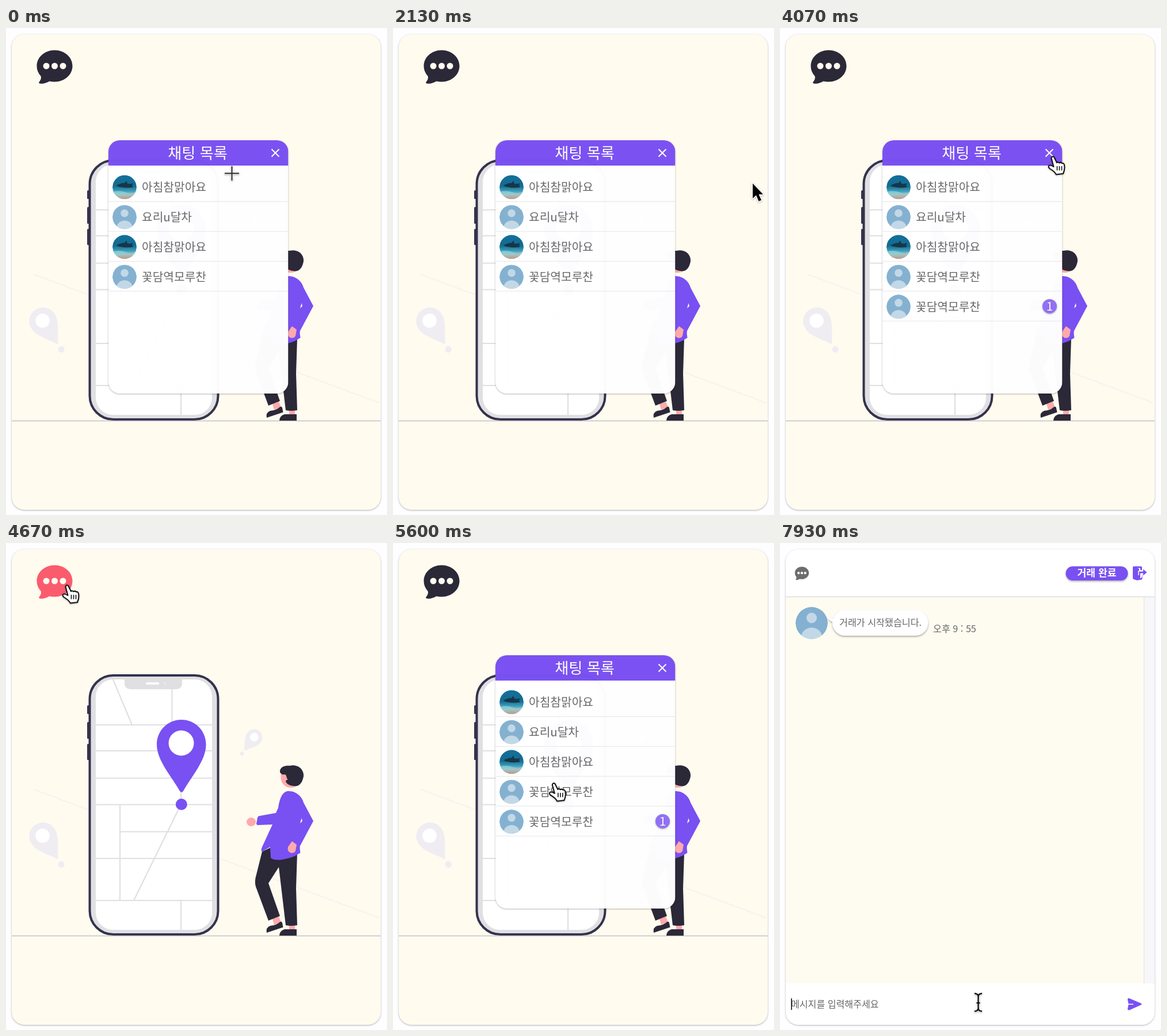
Write an HTML page that moves like this. It is 662 px wide and 846 px high and loops after 8 s.

```html
<!DOCTYPE html>
<html lang="ko">
<head>
<meta charset="utf-8">
<style>
html, body { margin: 0; width: 100%; height: 100%; overflow: hidden; background: #fefdff; }
svg { display: block; width: 662px; height: 846px; font-family: "Noto Sans CJK KR", "Noto Sans CJK", "Noto Sans", sans-serif; fill: none; }
text { white-space: pre; }
.p { fill: #7950f2; }
.d { fill: #2b2838; }
.k { fill: #ffa9ab; }
.w { fill: #fff; }
.g { fill: #e0dfe2; }
.t { fill: #666; }
.pale { fill: #efedf2; }
.soft { filter: drop-shadow(0 1px 1.5px rgba(0,0,0,.3)); }
.low { filter: drop-shadow(0 2px 1.5px rgba(0,0,0,.3)); }
#spin { box-sizing: border-box; width: 117px; height: 117px; border-radius: 50%;
  border: 7px solid #dad5ea; border-left: 9px solid #7950f2; }
</style>
</head>
<body>
<svg viewBox="0 0 662 846">
  <defs>
    <clipPath id="card"><rect x="10" y="11" width="641" height="826" rx="22"/></clipPath>
    <clipPath id="round"><circle r="21"/></clipPath>
    <clipPath id="panel"><rect x="178" y="195" width="312.5" height="440" rx="20"/></clipPath>
    <linearGradient id="sea" x2="0" y2="1">
      <stop offset="0" stop-color="#0f6f9c"/><stop offset=".45" stop-color="#12688f"/>
      <stop offset=".68" stop-color="#3fa3bd"/><stop offset=".8" stop-color="#a9c3c4"/>
      <stop offset="1" stop-color="#b49a88"/>
    </linearGradient>
    <path id="pin" d="M304.8 307C328.5 307 347.5 326 347.5 350C347.5 378 323 404 308 431Q305 435 302 431C287 404 262 378 262 350C262 326 281 307 304.8 307Z"/>
    <g id="marker">
      <use href="#pin"/><circle class="w" cx="304.5" cy="347.5" r="22"/><circle cx="304.8" cy="454" r="10"/>
    </g>
    <path id="bubble" d="M84.5 38.5C101.600 38.5 115.500 50.700 115.500 66C115.500 81.300 101.600 93.500 84.500 93.500Q80 93.500 75.500 92.500Q67 97.500 59 96.500Q55.500 95.500 58.500 92.500Q62 88 60.500 83.500Q53.500 76 53.500 66C53.500 50.700 67.400 38.500 84.500 38.500Z"/>
    <g id="dots"><circle cx="70" cy="66" r="5.500"/><circle cx="84.500" cy="66" r="5.500"/><circle cx="99" cy="66" r="5.500"/></g>
    <g id="user" clip-path="url(#round)">
      <circle r="21" fill="#84b0d1"/>
      <g fill="#c3d8e7"><circle cy="-6.700" r="6.800"/><ellipse cy="18" rx="13.500" ry="12"/></g>
    </g>
    <g id="photo" clip-path="url(#round)">
      <circle r="21" fill="url(#sea)"/>
      <path d="M-14 -3Q-4 -8 0 -7L3 -11L5 -6Q10 -5 15 -7L13 -3L15 0Q2 2 -5 0Q-11 0 -14 -3Z" fill="#123447"/>
      <path d="M-21 8Q-8 5 2 9T21 7V12Q8 10 -2 13T-21 11Z" fill="#8ed0d8" opacity=".8"/>
    </g>
  </defs>

  <rect class="soft" x="10" y="11" width="641" height="826" rx="22" fill="#fffbef"/>

  <g id="home">
    <use id="chatIcon" href="#bubble"/><use href="#dots" fill="#fffbef"/>
    <path d="M48 428L648 651" stroke="#eceaf0"/>
    <use href="#marker" class="pale" transform="translate(64.500 509.500) rotate(-33) scale(.56) translate(-305 -350)"/>
    <use href="#marker" class="pale" transform="translate(431 338) rotate(37) scale(.336) translate(-305 -350)"/>
    <g fill="#35324d">
      <rect x="141" y="282" width="6" height="15" rx="1.500"/>
      <rect x="141" y="311" width="6" height="29" rx="1.500"/>
      <rect x="141" y="349" width="6" height="28" rx="1.500"/>
    </g>
    <rect x="145.500" y="230" width="223" height="450" rx="41" class="g" stroke="#35324d" stroke-width="4"/>
    <rect x="156" y="237" width="202" height="435" rx="30" class="w"/>
    <path d="M156 316H358M156 361H358M156 408.500H358M156 454.500H358M198 501.500H358M156 548H358M156 621H358M198 454V621M288.500 250V316M304 621V672M186 237L219 316M304 430V454L222 621" stroke="#e0dfe2" stroke-width="2.200"/>
    <path class="g" d="M206 236H306V243Q306 254 295 254H217Q206 254 206 243Z"/>
    <rect class="w" x="243" y="242" width="23" height="4" rx="2"/><circle class="w" cx="276" cy="244" r="1"/>
    <use href="#marker" class="p"/>
    <path d="M10 682.500H651" stroke="#c3c1c7" stroke-width="1.600"/>

    <g id="man">
      <path class="k" d="M463 653L474 649L478 659L466 663ZM492 663H502V672H492Z"/>
      <path class="d" d="M445 536L462 528L490 545L506 539L504 600L506 664Q495 666 486 664L474 563L456 591L476 648L456 656L434 597Q432 590 433.500 582Z"/>
      <path class="d" d="M453 677Q451 668 459 665Q470 664 475 659Q479 656 480 660L481.500 667.500ZM475 682Q475 674 484 671H505V682Z"/>
      <path class="k" d="M478 400C475 416 484 425 495 425Q502 425 506 420L504 400Z"/>
      <path class="d" d="M476 398C475 390 484 386 492 387C508 383 518 394 517 405C515 418 508 424 499 422C490 421 487 417 486 414Q487 411 490 411C486 408 489 403 484 402Q478 403 476 398Z"/>
      <ellipse class="k" cx="426" cy="484.500" rx="8" ry="7.500"/>
      <path class="p" d="M473 460C476 440 482 431 491 431C504 431 514 440 517 451L534 483L511 526Q510 530 511.500 538Q500 547 480 550Q466 552 460 547L459 528L445 536Q442 535 445 528L463 489L438 490Q434 490 435.500 485L437 477Q438 474 441 474L469 469Z"/>
      <path d="M513.500 478L511 487L515 483Z" fill="#fffbef"/>
      <path class="k" d="M497 518L505 524L503 535Q500 540 494 538Q488 535 490 528Z"/>
    </g>

    <g id="dialog" class="soft">
      <g clip-path="url(#panel)">
        <rect class="w" x="178" y="195" width="312.500" height="440"/>
        <rect class="p" x="178" y="195" width="312.500" height="44"/>
      </g>
      <text x="333" y="227" font-size="26.100" text-anchor="middle" class="w">채팅 목록</text>
      <path d="M461.500 210.500L474.500 223.500M474.500 210.500L461.500 223.500" stroke="#fff" stroke-width="2"/>
      <g id="rows"></g>
    </g>
  </g>

  <g id="chat">
    <g clip-path="url(#card)">
      <rect class="w" x="10" y="11" width="641" height="826"/>
      <rect x="10" y="94" width="623" height="671" fill="#fefcf0"/>
      <rect x="633" y="94" width="18" height="671" fill="#f7f6f8"/>
      <path d="M632.500 94V765" stroke="#e2e1e4"/>
      <path d="M10 93.500H651" stroke="#dddce0" stroke-width="1.500"/>
    </g>
    <g transform="translate(38 52.500) scale(.395) translate(-84.500 -67)" fill="#6d6d70"><use href="#bubble"/><use href="#dots" class="w"/></g>
    <rect class="p low" x="496.500" y="40.500" width="108" height="24.500" rx="12.200"/>
    <text x="550.500" y="58" font-size="17.200" font-weight="700" text-anchor="middle" class="w">거래 완료</text>
    <path class="p" d="M613 42.500Q613 40.500 615 40.500H627Q629 40.500 629 42.500V47H626V43.500H621L624 45V49.500H631V45.500L637.500 51L631 56.500V52.500H626V61.500Q629 61 629 55H629.500V62Q629 64 627 64H624L621 65L614.500 63Q613 62.500 613 61Z"/>
    <path d="M623 48V56" stroke="#fff" stroke-width="1.500"/>
    <text x="19" y="806.500" font-size="16.100" class="t">메시지를 입력해주세요</text>
    <path class="p" d="M604 793Q604 790 607 791L627 799.500Q630 801 627 802.500L607 811.500Q604 812 604 809.500L605.500 802H614V800.500H605.500Z"/>
    <path id="caret" d="M20 791V811" stroke="#111" stroke-width="1.600"/>
    <g id="message">
      <use href="#user" transform="translate(55 139) scale(1.333)"/>
      <path class="w low" d="M113 117H235.500A22 22 0 0 1 235.500 161H113A22 22 0 0 1 91 137Q85 135 82 128Q87 133 92.500 132Q97 118 113 117Z"/>
      <text x="103" y="144" font-size="16.200" font-weight="500" class="t">거래가 시작됐습니다.</text>
      <text x="266" y="155" font-size="16.200" class="t">오후 9 : 55</text>
    </g>
    <foreignObject id="loader" x="272" y="407" width="118" height="118"><div id="spin"></div></foreignObject>
  </g>

  <g id="cursor" class="soft" stroke-linejoin="round">
    <g id="cross">
      <path d="M-13 0H13M0 -13V13" stroke="#fff" stroke-width="4"/>
      <path d="M-12.500 0H12.500M0 -12.500V12.500" stroke="#222" stroke-width="2"/>
    </g>
    <path id="arrow" d="M0 0V26L6 20.500L10.500 31L15 29L10.500 19H18Z" fill="#000" stroke="#fff" stroke-width="3" paint-order="stroke"/>
    <g id="hand" stroke="#111" stroke-width="2">
      <path class="w" d="M-1.500 2Q-.5 -2 3 0L8 10Q10 8 12 10.500Q15 8.500 17 11Q20 10 21 14Q22.500 21 19 29L7 30.500Q4 25 -4 20.500Q-8 17 -5.500 15Q-3 13.500 2.500 17Z"/>
      <path d="M8.500 16V23.500M12.500 16V23.500M16.500 16V23.500" stroke-width="1.600"/>
    </g>
    <g id="beam">
      <path d="M-6.500 -15.500Q0 -15 0 -10V10Q0 15 -6.500 15.500M6.500 -15.500Q0 -15 0 -10M0 10Q0 15 6.500 15.500M-3 1H3" stroke="#fff" stroke-width="4"/>
      <path d="M-6.500 -15.500Q0 -15 0 -10V10Q0 15 -6.500 15.500M6.500 -15.500Q0 -15 0 -10M0 10Q0 15 6.500 15.500M-3 1H3" stroke="#111" stroke-width="2.400"/>
    </g>
  </g>
</svg>
<script>
const LOOP = 8000;
const $ = id => document.getElementById(id);
const show = (id, on) => { $(id).style.display = on ? '' : 'none'; };
const clamp = v => Math.min(1, Math.max(0, v));
const smooth = p => p * p * (3 - 2 * p);
const part = (t, from, to) => clamp((t - from) / (to - from));

const rows = [
  ['photo', '아침참맑아요'], ['user', '요리u달차'], ['photo', '아침참맑아요'],
  ['user', '꽃담역모루찬'], ['user', '꽃담역모루찬']
];
$('rows').innerHTML = rows.map(([pic, name], i) => `
  <g id="row${i}" transform="translate(0 ${i * 51.9})">
    <use href="#${pic}" x="206" y="276.5" transform="translate(0 0)"/>
    <text x="236" y="284.300" font-size="20.300" class="t">${name}</text>
    <path d="M178 301.500H490" stroke="#ebebf0" stroke-width="1.300"/>
    ${i === 4 ? '<circle class="soft" cx="468.500" cy="275.800" r="12.500" fill="#9272f3"/><text x="468.500" y="283" font-size="20" text-anchor="middle" class="w">1</text>' : ''}
  </g>`).join('');

// time, x, y
const path = [
  [0, 392.5, 252.5], [870, 392.5, 252.5], [1600, 625, 270], [2670, 625, 270],
  [3650, 473, 224], [4150, 473, 224], [4620, 105, 74], [4780, 105, 74],
  [5130, 157, 133], [5780, 306, 483], [6950, 306, 483], [7650, 344.5, 798], [LOOP, 344.5, 798]
];
function cursorAt(t) {
  const i = Math.max(1, path.findIndex(k => k[0] > t));
  const [a, b] = [path[i - 1], path[i]];
  const p = smooth(part(t, a[0], b[0]));
  return [a[1] + (b[1] - a[1]) * p, a[2] + (b[2] - a[2]) * p];
}

function render(t) {
  const inChat = t >= 6130;
  const [x, y] = cursorAt(t);
  const overIcon = !inChat && x < 118 && y < 98;
  const open = t < 4600 ? 1 - part(t, 4200, 4400) : 1 - (1 - part(t, 4830, 5230)) ** 1.700;

  show('home', !inChat);
  show('chat', inChat);
  $('chatIcon').setAttribute('fill', overIcon ? '#fa5c6e' : '#2b2838');
  $('dialog').style.opacity = open * .985;
  $('dialog').setAttribute('transform', `translate(0 ${20 * (1 - open)})`);
  show('row4', t >= 2670);

  show('loader', t < 6730);
  show('message', t >= 6730);
  show('caret', t >= 7930);
  $('spin').style.transform = `rotate(${(t - 6130) / 1100 * 360}deg)`;

  const overClose = open > .5 && Math.abs(x - 468) < 14 && Math.abs(y - 217) < 14;
  const overRow = t > 5200 && y > 250;
  const kind = t < 300 ? 'cross'
    : inChat ? (y > 765 ? 'beam' : 'arrow')
    : overIcon || overClose || overRow ? 'hand' : 'arrow';
  ['cross', 'arrow', 'hand', 'beam'].forEach(c => show(c, c === kind));
  $('cursor').setAttribute('transform', `translate(${x} ${y})`);
}

const start = performance.now();
(function tick() {
  render((performance.now() - start) % LOOP);
  requestAnimationFrame(tick);
})();
</script>
</body>
</html>
```
